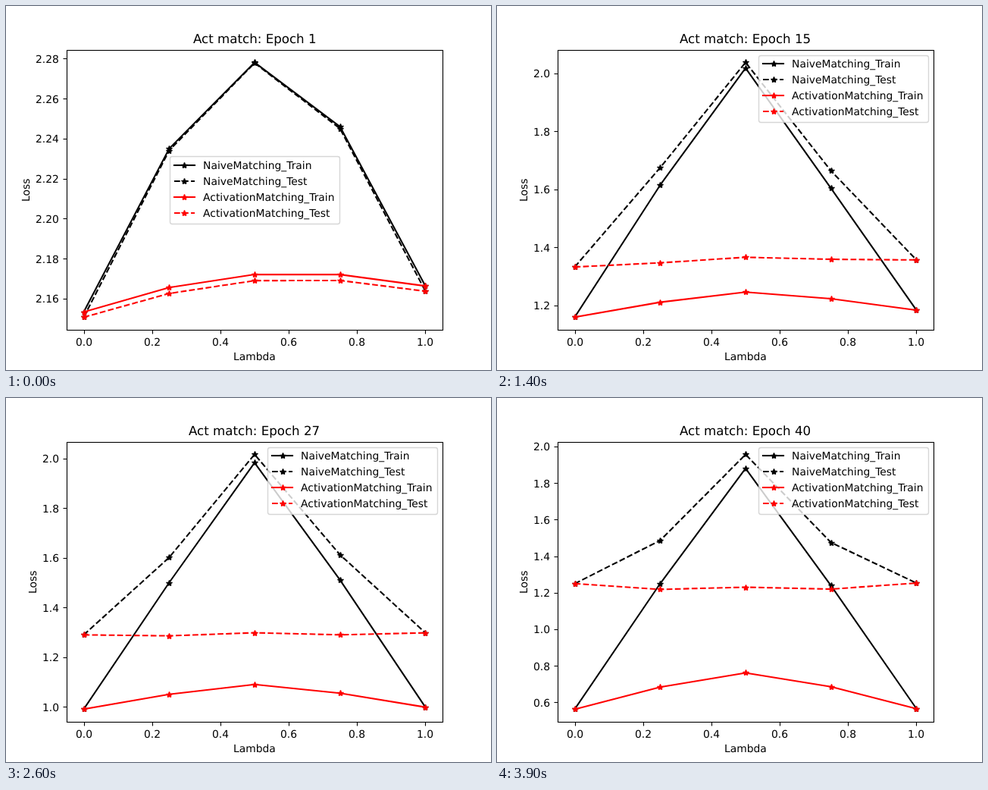
These frames come from a looping animation (640x480 px, 4 s). An HTML page with a canvas:

```html
<!DOCTYPE html>
<html lang="en">
<head>
<meta charset="utf-8">
<title>Loss by epoch</title>
<style>
  html, body { margin: 0; width: 100%; height: 100%; overflow: hidden; background: #fff; }
  canvas { display: block; }
</style>
</head>
<body>
<canvas id="stage" width="640" height="480"></canvas>
<script>
const ctx = document.getElementById('stage').getContext('2d');
const PT = 100 / 72;
const FONT = '"DejaVu Sans", sans-serif';
const AXES = { left: 80, right: 576, top: 57.6, bottom: 427.2 };
const EPOCHS = 40, EPOCH_MS = 100;

const STYLES = [
  { label: 'NaiveMatching_Train', color: '#000', dashed: false },
  { label: 'NaiveMatching_Test', color: '#000', dashed: true },
  { label: 'ActivationMatching_Train', color: '#f00', dashed: false },
  { label: 'ActivationMatching_Test', color: '#f00', dashed: true },
];

// Key points of the training run: end losses and the peak of the naive curve.
const KEYS = [
  { epoch: 1, train: 2.1598, test: 2.1572, peak: 2.2781 },
  { epoch: 6, train: 1.3695, test: 1.440, peak: 2.063 },
  { epoch: 11, train: 1.2305, test: 1.365, peak: 2.034 },
  { epoch: 19, train: 1.1200, test: 1.329, peak: 2.004 },
  { epoch: 27, train: 0.9946, test: 1.294, peak: 1.983 },
  { epoch: 34, train: 0.7377, test: 1.2535, peak: 1.903 },
  { epoch: 37, train: 0.6100, test: 1.2525, peak: 1.887 },
  { epoch: 40, train: 0.5645, test: 1.2515, peak: 1.880 },
];

// Cubic through the key points that never overshoots.
function track(name) {
  const xs = KEYS.map(k => k.epoch), ys = KEYS.map(k => k[name]), last = xs.length - 1;
  const secant = i => (ys[i + 1] - ys[i]) / (xs[i + 1] - xs[i]);
  const slope = i => {
    if (i === 0) return 1.4 * secant(0);
    if (i === last) return 0;
    const a = secant(i - 1), b = secant(i);
    return a * b <= 0 ? 0 : 2 * a * b / (a + b);
  };
  return x => {
    let i = 0;
    while (i < last - 1 && x >= xs[i + 1]) i++;
    const h = xs[i + 1] - xs[i], t = (x - xs[i]) / h, u = 1 - t;
    return u * u * (1 + 2 * t) * ys[i] + t * t * (3 - 2 * t) * ys[i + 1]
      + h * t * u * (u * slope(i) - t * slope(i + 1));
  };
}
const trainLoss = track('train'), testLoss = track('test'), naivePeak = track('peak');

// Five losses along lambda; the tilts lift the right side and lower the left.
function curve(end, shoulder, peak, endTilt, shoulderTilt) {
  return [
    end - endTilt / 2,
    end + shoulder - shoulderTilt / 2,
    end + peak,
    end + shoulder + shoulderTilt / 2,
    end + endTilt / 2,
  ];
}

// Curve shapes follow from the gap between test and train loss.
function seriesAt(epoch) {
  const train = trainLoss(epoch), test = testLoss(epoch);
  const gap = test - train;
  const early = Math.exp((1 - epoch) / 1.5);
  const tilt = 0.013 + 0.012 * Math.sin(2 * Math.PI * (epoch - 1) / 46);
  const naiveTilt = 0.011 * Math.cos(2 * Math.PI * (epoch - 1) / 26);

  const trainRise = naivePeak(epoch) - train;
  const testRise = trainRise - gap * 0.888;
  const naiveShoulder = 0.517 + 0.165 * early;
  const bumpShoulder = 0.61 + 0.12 * early;
  const trainBump = 0.084 + 0.14 * gap * gap + 0.02 * early;
  const testBump = 0.075 - 0.29 * gap + 0.2 * gap * gap + 0.022 * early;

  return [
    curve(train, trainRise * naiveShoulder, trainRise, tilt, naiveTilt),
    curve(test, testRise * (naiveShoulder - 0.28 * gap), testRise, tilt, naiveTilt),
    curve(train, trainRise * trainBump * bumpShoulder, trainRise * trainBump, tilt, tilt / 2),
    curve(test, testRise * (testBump * bumpShoulder - 0.04 * gap), testRise * testBump, tilt, tilt / 2),
  ];
}

const px = lambda => AXES.left + 496 * (0.05 + lambda) / 1.1;
const snap = v => Math.round(v) + 0.5;

// anchor: 0 = left, 0.5 = centre, 1 = right
function text(str, x, y, anchor = 0, size = 10) {
  ctx.font = `${size * PT}px ${FONT}`;
  ctx.textRendering = 'geometricPrecision';
  ctx.fillStyle = '#000';
  ctx.fillText(str, Math.round(x - anchor * ctx.measureText(str).width), y);
}

function segment(x0, y0, x1, y1) {
  ctx.beginPath();
  ctx.moveTo(x0, y0);
  ctx.lineTo(x1, y1);
  ctx.stroke();
}

// Every corner of the star sits on a pixel centre.
function star(x, y, color) {
  ctx.beginPath();
  for (let i = 0; i < 10; i++) {
    const a = i * Math.PI / 5, r = 3 * PT * (i % 2 ? 0.381966 : 1);
    ctx.lineTo(snap(Math.round(x) + r * Math.sin(a)), snap(Math.round(y) - r * Math.cos(a)));
  }
  ctx.closePath();
  ctx.fillStyle = ctx.strokeStyle = color;
  ctx.lineWidth = PT;
  ctx.lineJoin = 'bevel';
  ctx.fill();
  ctx.stroke();
}

function polyline(points, { color, dashed }) {
  ctx.save();
  ctx.strokeStyle = color;
  ctx.lineWidth = 1.5 * PT;
  ctx.lineJoin = 'round';
  ctx.lineCap = dashed ? 'butt' : 'square';
  if (dashed) ctx.setLineDash([5.55 * PT, 2.4 * PT]);
  ctx.beginPath();
  points.forEach(([x, y]) => ctx.lineTo(x, y));
  ctx.stroke();
  ctx.restore();
}

function drawAxes(lo, hi, py) {
  ctx.strokeStyle = '#000';
  ctx.lineWidth = 0.8 * PT;
  ctx.lineJoin = 'miter';
  const left = snap(AXES.left), bottom = snap(AXES.bottom), top = snap(AXES.top);
  ctx.strokeRect(left, top, snap(AXES.right) - left, bottom - top);

  for (let i = 0; i <= 5; i++) {
    const x = px(i / 5);
    segment(snap(x), bottom, snap(x), bottom + 5);
    text((i / 5).toFixed(1), x, 448, 0.5);
  }

  // The smallest round step that gives at most nine intervals.
  const step = [0.02, 0.05, 0.1, 0.2].find(s => s >= (hi - lo) * 1.1 / 9);
  const digits = step < 0.1 ? 2 : 1;
  for (let k = Math.floor(lo / step) - 1; k * step < hi + step; k++) {
    const y = py(k * step);
    if (y < AXES.top || y > AXES.bottom) continue;
    segment(left, snap(y), left - 5, snap(y));
    text((k * step).toFixed(digits), 70.3, Math.round(y + 5.4), 1);
  }

  text('Lambda', 328, 467, 0.5);
  ctx.save();
  ctx.translate(digits === 1 ? 40 : 31, 243);
  ctx.rotate(-Math.PI / 2);
  text('Loss', 0, 0, 0.5);
  ctx.restore();
}

function drawLegend(x, y, firstRow) {
  const left = snap(x), top = snap(y);
  ctx.beginPath();
  ctx.roundRect(left, top, snap(x + 223.9) - left, snap(y + 88.6) - top, 2 * PT);
  ctx.fillStyle = 'rgba(255,255,255,0.8)';
  ctx.strokeStyle = 'rgba(204,204,204,0.8)';
  ctx.lineWidth = PT;
  ctx.fill();
  ctx.stroke();
  STYLES.forEach((style, i) => {
    const row = firstRow + 21 * i, start = x + 4 * PT;
    polyline([[Math.round(start), row], [Math.round(start + 20 * PT), row]], style);
    star(start + 10 * PT, row, style.color);
    text(style.label, start + 28 * PT - 0.5, row + 5);
  });
}

function draw(epoch) {
  const series = seriesAt(epoch);
  const all = series.flat();
  const lo = Math.min(...all), hi = Math.max(...all);
  const py = v => 410.4 - 336 * (v - lo) / (hi - lo);

  ctx.fillStyle = '#fff';
  ctx.fillRect(0, 0, 640, 480);
  series.forEach((values, i) => {
    const points = values.map((v, j) => [px(j / 4), py(v)]);
    polyline(points, STYLES[i]);
    points.forEach(([x, y]) => star(x, y, STYLES[i].color));
  });
  drawAxes(lo, hi, py);
  text(`Act match: Epoch ${epoch}`, 328, 49, 0.5, 12);

  // The legend sits in the middle when no line crosses that area.
  const [naiveTrain, naiveTest, ...matched] = series;
  const above = [naiveTrain[1], naiveTrain[3], naiveTest[1], naiveTest[3]];
  const centreFree = above.every(v => py(v) < 196) && matched.flat().every(v => py(v) > 288);
  if (centreFree) drawLegend(216.05, 198.1, 210);
  else drawLegend(345.15, 64.6, 76);
}

const start = performance.now();
function tick() {
  const elapsed = Math.max(0, performance.now() - start);
  draw(Math.floor(elapsed / EPOCH_MS) % EPOCHS + 1);
  requestAnimationFrame(tick);
}
tick();
</script>
</body>
</html>
```
